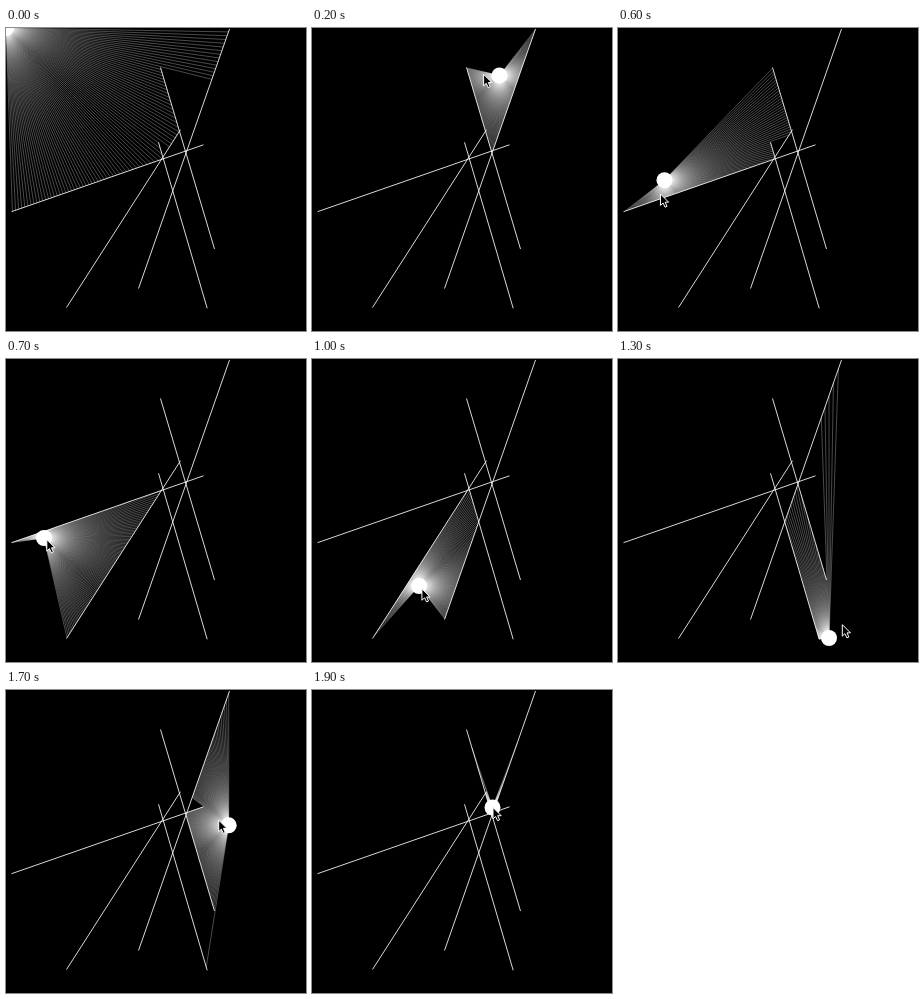
An HTML page with a canvas that plays this animation: 300x303 px, repeating every 2 s.

```html
<!DOCTYPE html>
<html lang="en">
<head>
<meta charset="utf-8">
<title>Ray casting</title>
<style>
  html, body { margin: 0; width: 100%; height: 100%; overflow: hidden; background: #000; }
  canvas { display: block; width: 300px; height: 303px; }
</style>
</head>
<body>
<canvas id="stage" width="300" height="303"></canvas>
<script>
const ctx = document.getElementById('stage').getContext('2d');
const LOOP = 2000, STEP = 100;
const LEAD = 33; // ms by which the pointer runs ahead of the lamp

// Each wall: x1, y1, x2, y2
const walls = [
  [223.5, 1, 132.5, 260.5],
  [154.5, 39.5, 208.5, 221],
  [5.5, 183.7, 197.5, 116.8],
  [60.5, 279.5, 174.5, 101.7],
  [152.5, 114.3, 201.2, 280.3]
];

// The lamp's path; it slows to a stop where `rest` is set
const path = [
  { t: 100, x: 236, y: 49 },
  { t: 400, x: 99, y: 57 },
  { t: 700, x: 38, y: 179, rest: true },
  { t: 1000, x: 107, y: 227, rest: true },
  { t: 1200, x: 162, y: 276 },
  { t: 1300, x: 211, y: 279 },
  { t: 1500, x: 270, y: 180 },
  { t: 1900, x: 180.5, y: 117.5, rest: true }
];

const arrow = new Path2D('M0 0V11.5L2.6 9L4.6 13.2L6.6 12.3L4.7 8.2H8.2Z');

function velocity(i, axis) {
  if (path[i].rest) return 0;
  const before = path[Math.max(i - 1, 0)];
  const after = path[Math.min(i + 1, path.length - 1)];
  return (after[axis] - before[axis]) / (after.t - before.t);
}

// Cubic Hermite curve through the path points
function pathAt(time, axis) {
  const next = path.findIndex((point, i) => i > 0 && point.t >= time);
  const end = next < 0 ? path.length - 1 : next;
  const a = path[end - 1], b = path[end];
  const span = b.t - a.t;
  const s = Math.min((time - a.t) / span, 1);
  const ease = s * s * (3 - 2 * s);
  return a[axis] + (b[axis] - a[axis]) * ease
    + span * s * (1 - s) * ((1 - s) * velocity(end - 1, axis) - s * velocity(end, axis));
}

// Distance along a ray to a wall, or Infinity when it misses
function hitDistance(x, y, dx, dy, [x1, y1, x2, y2]) {
  const wx = x2 - x1, wy = y2 - y1;
  const det = dx * wy - dy * wx;
  if (Math.abs(det) < 1e-9) return Infinity;
  const along = ((x1 - x) * wy - (y1 - y) * wx) / det;
  const onWall = ((x1 - x) * dy - (y1 - y) * dx) / det;
  return along > 0 && onWall >= 0 && onWall <= 1 ? along : Infinity;
}

function line(x1, y1, x2, y2) {
  ctx.beginPath();
  ctx.moveTo(x1, y1);
  ctx.lineTo(x2, y2);
  ctx.stroke();
}

function drawRays(x, y) {
  ctx.strokeStyle = 'rgba(255, 255, 255, .39)';
  ctx.lineWidth = 0.75;
  for (let degree = 0; degree < 360; degree++) {
    const angle = degree * Math.PI / 180;
    const dx = Math.cos(angle), dy = Math.sin(angle);
    const reach = Math.min(...walls.map(wall => hitDistance(x, y, dx, dy, wall)));
    if (reach < Infinity) line(x, y, x + dx * reach, y + dy * reach);
  }
}

function drawLamp(x, y) {
  drawRays(x, y);
  ctx.fillStyle = '#fff';
  ctx.beginPath();
  ctx.arc(x, y, 8, 0, 2 * Math.PI);
  ctx.fill();
}

function drawPointer(x, y) {
  ctx.save();
  ctx.translate(x, y);
  ctx.fillStyle = '#000';
  ctx.strokeStyle = '#fff';
  ctx.lineWidth = 1;
  ctx.fill(arrow);
  ctx.stroke(arrow);
  ctx.restore();
}

function draw(time) {
  ctx.fillStyle = '#000';
  ctx.fillRect(0, 0, 300, 303);
  ctx.strokeStyle = '#fff';
  ctx.lineWidth = 0.85;
  walls.forEach(wall => line(...wall));

  // The lamp waits in the corner until the pointer enters
  if (time < path[0].t) {
    drawLamp(0, 0);
  } else {
    drawLamp(pathAt(time, 'x'), pathAt(time, 'y'));
    drawPointer(pathAt(time + LEAD, 'x') + 0.5, pathAt(time + LEAD, 'y'));
  }
}

function tick() {
  const time = performance.now() % LOOP;
  draw(Math.floor(time / STEP) * STEP);
  requestAnimationFrame(tick);
}
tick();
</script>
</body>
</html>
```
